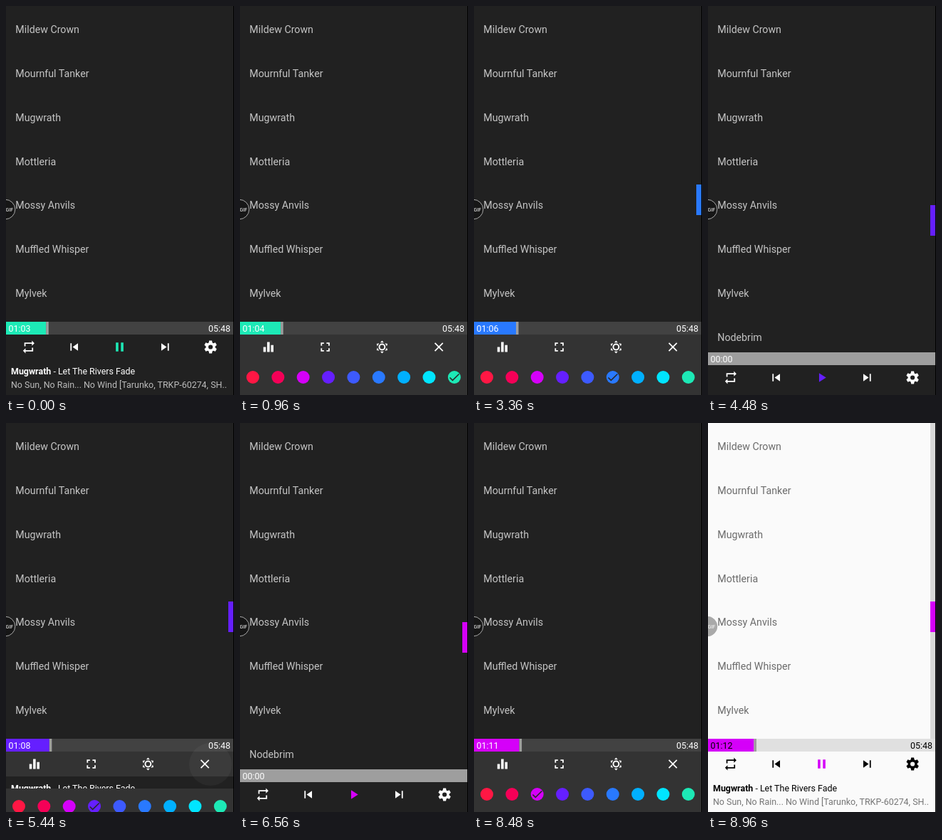
An HTML page for the animation above (9.6 s loop, 320x547 px).

```html
<!DOCTYPE html>
<html lang="en">
<head>
<meta charset="utf-8">
<title>Music player theming</title>
<style>
  html, body { margin: 0; width: 100%; height: 100%; overflow: hidden; background: #212121; }
  svg {
    display: block; width: 320px; height: 547px;
    font-family: Roboto, sans-serif; font-size: 12.44px;
    --bg: #212121; --panel: #333; --ink: #fff; --row: #c4c4c4; --sub: #bcbcbc;
    --track: #424242; --scroll: #212121; --badge: #161616; --ring: #aaa;
  }
  svg.light {
    --bg: #fafafa; --ink: #000; --row: #6c6c6c; --sub: #757575;
    --track: #e0e0e0; --scroll: #d8d8d8; --badge: #a9a9a9; --ring: #a9a9a9;
  }
  .bg { fill: var(--bg); }
  .panel { fill: var(--panel); }
  .ink { fill: var(--ink); }
  .accent { fill: var(--accent); }
  .rows { fill: var(--row); font-size: 14.22px; }
  .sub { fill: var(--sub); }
  .bold { font-weight: 700; }
</style>
</head>
<body>
<svg viewBox="0 0 320 547">
  <defs>
    <clipPath id="revealClip"><rect id="reveal" y="462" height="35"/></clipPath>
  </defs>
  <rect class="bg" width="320" height="547"/>
  <g class="rows" id="rows"></g>
  <g id="scroller">
    <rect x="312" width="8" height="500" fill="var(--scroll)"/>
    <rect id="thumb" class="accent" x="312" width="8" height="43"/>
  </g>
  <g>
    <circle cx="-1" cy="286" r="13.8" fill="var(--badge)" stroke="var(--ring)"/>
    <text x="-.5" y="288.5" font-size="7.2" fill="#fff">GIF</text>
  </g>
  <g id="sheet">
    <rect class="bg" y="444" width="320" height="103"/>
    <rect id="track" y="444" width="320" height="18"/>
    <g id="progress">
      <rect id="played" class="accent" y="444" height="18"/>
      <rect id="handle" y="444" width="3.5" height="18" fill="#9e9e9e"/>
      <text class="ink" x="284" y="458">05:48</text>
    </g>
    <text id="clock" class="ink" x="3.5" y="458"></text>
    <g class="ink" id="controls"></g>
    <g class="accent" id="toggle"></g>
    <text class="ink" x="7" y="518"><tspan class="bold">Mugwrath</tspan> - Let The Rivers Fade</text>
    <text class="sub" x="7" y="536.5">No Sun, No Rain... No Wind [Tarunko, TRKP-60274, SH..</text>
  </g>
  <g id="settings">
    <g clip-path="url(#revealClip)">
      <rect class="panel" y="462" width="320" height="35"/>
      <g class="ink" id="tools"></g>
    </g>
    <g id="palette">
      <rect class="panel" y="497" width="320" height="50"/>
      <g id="swatches"></g>
      <g id="check"></g>
    </g>
  </g>
  <circle id="ripple" r="30" fill="#fff"/>
  <rect x="319" width="1" height="547" fill="#000"/>
</svg>
<script>
const LOOP = 9600, STEP = 160;
const WIDTH = 319;
const ICON_SCALE = 0.889;
const SHEET_SHIFT = 43;

const artists = ['Mildew Crown', 'Mournful Tanker', 'Mugwrath', 'Mottleria',
  'Mossy Anvils', 'Muffled Whisper', 'Mylvek', 'Nodebrim'];
const colors = ['#ff1744', '#f50057', '#d500f9', '#651fff', '#3d5afe',
  '#2979ff', '#00b0ff', '#00e5ff', '#1de9b6'];

const path = d => `<path d="${d}"/>`;
const spokes = (count, d) => Array.from({ length: count }, (_, i) =>
  `<path d="${d}" transform="rotate(${i * 360 / count} 12 12)"/>`).join('');
const ring = (r, width) =>
  `<circle cx="12" cy="12" r="${r}" fill="none" stroke="var(--ink)" stroke-width="${width}"/>`;

const icons = {
  repeat: path('M7 7h10v3l4-4-4-4v3H5v6h2V7zm10 10H7v-3l-4 4 4 4v-3h12v-6h-2v4z'),
  previous: path('M6 6h2v12H6zm3.5 6l8.5 6V6z'),
  next: path('M6 18l8.5-6L6 6v12zM16 6v12h2V6h-2z'),
  pause: path('M6 19h4V5H6v14zm8-14v14h4V5h-4z'),
  play: path('M8 5v14l11-7z'),
  gear: ring(5.4, 3.8) + spokes(6, 'M9.8 2h4.4l.9 4.6h-6.2z'),
  levels: path('M10 20h4V4h-4v16zm-6 0h4v-8H4v8zM16 9v11h4V9h-4z'),
  expand: path('M7 14H5v5h5v-2H7v-3zm-2-4h2V7h3V5H5v5zm12 7h-3v2h5v-5h-2v3zM14 5v2h3v3h2V5h-5z'),
  sun: ring(4.4, 2.2) + spokes(6, 'M12 2l2.8 3h-5.6z'),
  close: path('M19 6.4L17.6 5 12 10.6 6.4 5 5 6.4l5.6 5.6L5 17.6 6.4 19l5.6-5.6 5.6 5.6 1.4-1.4-5.6-5.6z'),
  check: path('M9 16.2L4.8 12l-1.4 1.4L9 19 21 7l-1.4-1.4z'),
};

const $ = id => document.getElementById(id);
const svg = document.querySelector('svg');
const set = (id, attrs) => {
  for (const name in attrs) $(id).setAttribute(name, attrs[name]);
};
const show = (id, visible) => set(id, { visibility: visible ? 'visible' : 'hidden' });
const place = (name, x, y = 479.5, scale = ICON_SCALE) =>
  `<g transform="translate(${x} ${y}) scale(${scale}) translate(-12 -12)">${icons[name]}</g>`;
const iconRow = names => names.map((name, i) =>
  name ? place(name, WIDTH * (i + 0.5) / names.length) : '').join('');
const clamp = v => Math.min(1, Math.max(0, v));
const ease = v => (1 - Math.cos(Math.PI * clamp(v))) / 2;
const swatchX = i => 18 + i * 35.35;

$('rows').innerHTML = artists.map((name, i) =>
  `<text x="13.3" y="${38 + i * 61.85}">${name}</text>`).join('');
$('controls').innerHTML = iconRow(['repeat', 'previous', '', 'next', 'gear']);
$('tools').innerHTML = iconRow(['levels', 'expand', 'sun', 'close']);
$('swatches').innerHTML = colors.map((color, i) =>
  `<circle cx="${swatchX(i)}" cy="522" r="9" fill="${color}"/>`).join('');

// One scene per theme: press and open the settings, pick a colour, restart the screen.
const scenes = [
  { press: 320, open: 320, pick: 1440, restart: 1920, color: 8 },
  { press: 2880, open: 3040, pick: 4000, restart: 4480, color: 5 },
  { press: 5120, open: 5280, pick: 6240, restart: 6560, color: 3 },
  { press: 7360, open: 7360, pick: 8640, restart: 8640, color: 2 },
  { press: Infinity, open: Infinity, pick: Infinity, restart: Infinity, color: 2, light: true },
];

function drawPlayer(t, sinceRestart) {
  const loading = sinceRestart < STEP;
  const shift = Math.round(SHEET_SHIFT * (1 - ease((sinceRestart - 80) / 160)));
  const seconds = Math.floor(63.2 + t / 1000);
  const x = WIDTH * seconds / 348;
  const minute = Math.floor(seconds / 60), rest = seconds % 60;

  set('sheet', { transform: `translate(0 ${shift})` });
  set('track', { fill: loading ? '#9e9e9e' : 'var(--track)' });
  set('played', { width: x - 1.5 });
  set('handle', { x: x - 1.5 });
  show('progress', !loading);
  $('clock').textContent = loading ? '00:00' : `0${minute}:${String(rest).padStart(2, '0')}`;
  $('toggle').innerHTML = place(loading ? 'play' : 'pause', WIDTH / 2);

  set('thumb', { y: 251 + 29 * shift / SHEET_SHIFT });
  set('scroller', { transform: `translate(${8 * clamp((sinceRestart - 1660) / 150)} 0)` });
}

function drawSettings(t, scene, nextColor) {
  const opened = t - scene.open;
  const width = 320 * clamp(0.5 + opened / 320);
  const drop = Math.round(50 * (1 - ease((opened + 109) / 447)));
  const picked = t >= scene.pick;
  const grow = picked ? clamp(0.4 + (t - scene.pick) / 270) : 1;

  show('settings', opened >= 0);
  set('reveal', { x: WIDTH - width, width: width + 1 });
  set('palette', { transform: `translate(0 ${drop})` });
  $('check').innerHTML = `<g fill="#282828">${
    place('check', swatchX(picked ? nextColor : scene.color), 522, 0.8 * grow)}</g>`;

  // The ripple drifts from the finger to the middle of the button.
  const pressed = t - scene.press;
  const drift = 1 - clamp(pressed / 320);
  show('ripple', pressed >= 0 && pressed < 480);
  set('ripple', {
    cx: 287 + 5 * drift,
    cy: 480 - 7 * drift,
    opacity: 0.04 * (1 - clamp((pressed - 320) / 160)),
  });
}

function draw(now) {
  const t = Math.floor(now % LOOP / STEP) * STEP;
  const index = scenes.findIndex(scene => t < scene.restart);
  const scene = scenes[index];
  const sinceRestart = index ? t - scenes[index - 1].restart : Infinity;
  const next = scenes[index + 1] || scene;

  svg.classList.toggle('light', Boolean(scene.light));
  svg.style.setProperty('--accent', colors[scene.color]);
  drawPlayer(t, sinceRestart);
  drawSettings(t, scene, next.color);
}

const start = performance.now();
function tick() {
  draw(performance.now() - start);
  requestAnimationFrame(tick);
}
tick();
</script>
</body>
</html>
```
